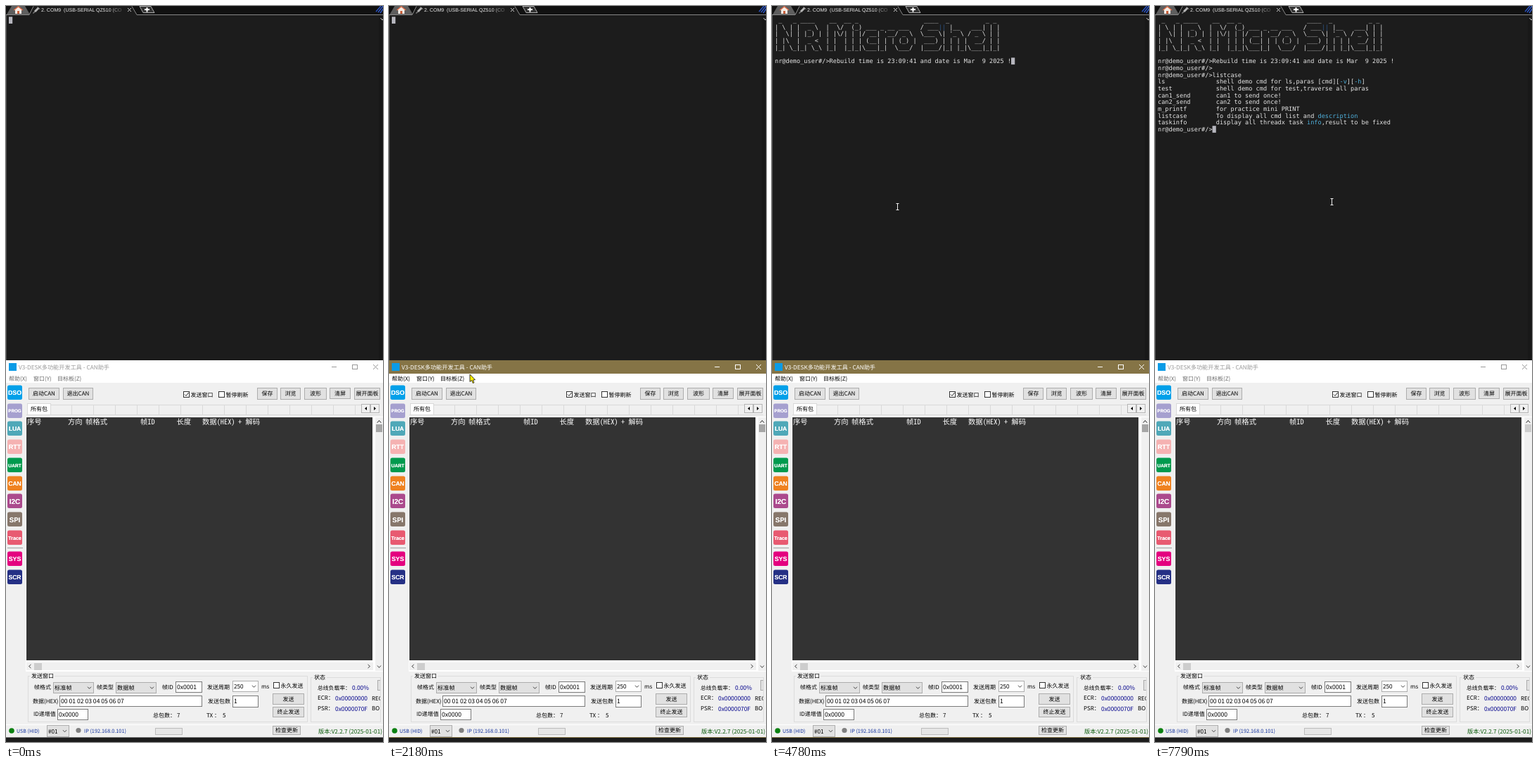
Recreate the animation shown at these times as an HTML page with a canvas. Size 536 by 1045 pixels, loop 8 s.

```html
<!DOCTYPE html>
<html lang="zh-CN">
<head>
<meta charset="utf-8">
<style>
html, body { margin: 0; width: 100%; height: 100%; overflow: hidden; background: #1c1c1c; }
canvas { display: block; }
</style>
</head>
<body>
<canvas id="stage" width="536" height="1045"></canvas>
<script>
const g = document.getElementById('stage').getContext('2d');
const LOOP = 8000, CELL = 5.17, ROW = 9.68;
const UI = '"Noto Sans CJK SC", "Noto Sans CJK", "Noto Sans", sans-serif';
const GRID = '"Noto Sans Mono CJK SC", "Noto Sans CJK SC", monospace';
const ARIAL = '"Liberation Sans", sans-serif';
const NAVY = '#00008b';

function box(x, y, x2, y2, fill, border) {
  if (fill) { g.fillStyle = fill; g.fillRect(x, y, x2 - x, y2 - y); }
  if (border) { g.strokeStyle = border; g.lineWidth = 1; g.strokeRect(x + .5, y + .5, x2 - x - 1, y2 - y - 1); }
}
function line(color, width, ...p) {
  g.strokeStyle = color; g.lineWidth = width; g.beginPath();
  for (let i = 0; i < p.length; i += 2) g.lineTo(p[i], p[i + 1]);
  g.stroke();
}
function poly(fill, ...p) {
  g.fillStyle = fill; g.beginPath();
  for (let i = 0; i < p.length; i += 2) g.lineTo(p[i], p[i + 1]);
  g.closePath(); g.fill();
}
function dot(x, y, r, fill) {
  g.fillStyle = fill; g.beginPath(); g.arc(x, y, r, 0, 7); g.fill();
}
// cy is the vertical centre of the glyphs
function text(s, x, cy, color = '#000', size = 8, font = UI, align = 'left') {
  g.font = `${size}px ${font}`; g.textAlign = align; g.fillStyle = color;
  g.fillText(s, x, cy + size * .37);
}
function chevron(x, y, dx, dy, color = '#444') {
  if (dy) line(color, 1, x - 2.5, y - dy, x, y + dy, x + 2.5, y - dy);
  else line(color, 1, x - dx, y - 2.5, x + dx, y, x - dx, y + 2.5);
}
function button(s, x, y, x2, y2) {
  box(x, y, x2, y2, '#e1e1e1', '#adadad');
  text(s, (x + x2) / 2, (y + y2) / 2, '#000', 8, UI, 'center');
}
function field(s, x, y, x2, y2) {
  box(x, y, x2, y2, '#fff', '#7a7a7a');
  text(s, x + 2, (y + y2) / 2 - .5, '#000', 8.6);
}
function combo(s, x, y, x2, y2, fill = '#e1e1e1') {
  box(x, y, x2, y2, fill, '#adadad');
  text(s, x + 2, (y + y2) / 2, '#000', 8.2);
  chevron(x2 - 6.5, (y + y2) / 2, 0, 1.3);
}
function check(s, x, y, on) {
  box(x, y, x + 9, y + 9, '#fff', '#333');
  if (on) line('#222', 1, x + 2, y + 4.5, x + 4, y + 6.5, x + 7.5, y + 2);
  text(s, x + 10.5, y + 4.7);
}

// ---- terminal ----
const PROMPT = 'nr@demo_user#/>';
const BOOT = String.raw` _   _ ____    __  __ _                  ____  _          _ _
| \ | |  _ \  |  \/  (_) ___ _ __ ___   / ___|| |__   ___| | |
|  \| | |_) | | |\/| | |/ __| '__/ _ \  \___ \| '_ \ / _ \ | |
| |\  |  _ <  | |  | | | (__| | | (_) |  ___) | | | |  __/ | |
|_| \_|_| \_\ |_|  |_|_|\___|_|  \___/  |____/|_| |_|\___|_|_|

` + PROMPT + 'Rebuild time is 23:09:41 and date is Mar  9 2025 !';
const HELP = [
  ['ls', 'shell demo cmd for ls,paras [cmd][-v][-h]'],
  ['test', 'shell demo cmd for test,traverse all paras'],
  ['can1_send', 'can1 to send once!'],
  ['can2_send', 'can2 to send once!'],
  ['m_printf', 'for practice mini PRINT'],
  ['listcase', 'To display all cmd list and description'],
  ['taskinfo', 'display all threadx task info,result to be fixed']
].map(([name, about]) => name.padEnd(16) + about).join('\n');

const typed = (t, from, to) => t < from ? 0 : Math.min(4, 1 + Math.floor((t - from) / (to - from) * 3 + .01));

function output(t) {
  if (t < 4090) return '';
  const part = Math.min(1, (Math.floor((t - 4090) / 70) + 1) / 5);
  let s = BOOT.slice(0, Math.round(BOOT.length * part));
  if (t >= 5610) s += '\n' + PROMPT;
  if (t >= 5810) s += '\n' + PROMPT + 'list'.slice(0, typed(t, 6470, 6860)) + 'case'.slice(0, typed(t, 7120, 7390));
  if (t >= 7790) s += '\n' + HELP + '\n' + PROMPT;
  return s;
}

function terminal(t) {
  box(0, 0, 536, 503, '#1c1c1c');
  box(530, 13, 536, 503, '#181818');
  box(0, 13, 1, 503, '#4a4a4a');
  chevron(535, 18.5, 0, 1.5, '#ccc');

  box(0, 0, 536, 12, '#111');
  poly('#5e5e5e', 1, 12, 8, 0, 27, 0, 34, 12);
  poly('#f4ece4', 11, 6, 17.5, 0, 24, 6, 22, 6, 22, 11, 13, 11, 13, 6);
  line('#d9603a', 1.3, 11, 6, 17.5, .8, 24, 6);
  box(16, 7, 19, 11, '#c8603c');
  poly('#1c1c1c', 33, 13, 39, 0, 179, 0, 186, 13);
  line('#888', 1, 0, 12.5, 33, 12.5, 39, .5);
  line('#888', 1, 179, .5, 186, 12.5, 536, 12.5);
  line('#b5b5b5', 3, 41, 8, 46, 3);
  line('#888', 1.2, 38.5, 10.5, 41, 8);
  line('#ddd', 1, 45, 1.5, 48, 4.5);
  const fade = g.createLinearGradient(146, 0, 168, 0);
  fade.addColorStop(0, '#eee'); fade.addColorStop(1, '#333');
  text('2. COM9  (USB-SERIAL QZ510 (CO', 50, 5.5, fade, 7.05, ARIAL);
  line('#ccc', 1, 173, 3, 178, 8);
  line('#ccc', 1, 178, 3, 173, 8);
  g.fillStyle = '#333'; g.beginPath(); g.moveTo(190, .5); g.lineTo(206, .5); g.lineTo(211, 9.5); g.lineTo(195, 9.5); g.closePath(); g.fill();
  line('#aaa', 1, 190, .5, 206, .5, 211, 9.5, 195, 9.5, 190, .5);
  line('#fff', 2, 197, 5, 204, 5);
  line('#fff', 2, 200.5, 2, 200.5, 8.5);
  for (const d of [0, 3, 6]) line('#2b55c8', 1.4, 526 + d, 8 + d / 3, 533 + d, 0);

  const rows = output(t).split('\n');
  g.font = '8.58px "DejaVu Sans Mono", monospace';
  g.textAlign = 'left';
  rows.forEach((row, r) => {
    const colors = Array(row.length).fill('#e6e6e6');
    for (const m of row.matchAll(/\|\||-[vh](?=\])|description|info(?=,)/g))
      colors.fill(m[0] === '||' ? '#2d5486' : '#4fb0dc', m.index, m.index + m[0].length);
    [...row].forEach((ch, c) => {
      g.fillStyle = colors[c];
      if (ch !== ' ') g.fillText(ch, 4 + c * CELL, 23.3 + r * ROW - 0.2);
    });
  });
  const last = rows.length - 1, cx = 4 + rows[last].length * CELL, cy = 15.3 + last * ROW;
  box(cx, cy, cx + 5.2, cy + 9.7, '#b6b6be');

  // selected blank row
  if (t >= 875 && t < 1020) box(4, 335, 526, 345, '#f0efed');
  if (t >= 1020 && t < 1560) box(4, 296, 526, 306, '#f0efed');
}

// ---- tool window ----
const ICONS = [
  ['DSO', 549, '#00a0e9', 8.8], ['PROG', 575, '#a6a0cf', 6.3], ['LUA', 600, '#4fa8b8', 8.6],
  ['RTT', 626, '#f5b2b2', 9], ['UART', 652, '#009a4e', 6.8], ['CAN', 678, '#ef8220', 8.6],
  ['I2C', 703, '#ab4a8d', 10], ['SPI', 729, '#87776b', 9.6], ['Trace', 755, '#e85a71', 7.2],
  ['SYS', 785, '#e4007f', 8.8], ['SCR', 811, '#253085', 8.6]
];
const MENU = [
  ['复位(50ms)  --软件和硬件复位(5)', 544], ['TVCC断电上电复位(200ms)(T)', 558],
  ['TVCC断电(V)', 572], ['TVCC上电(3.3V)(C)', 586], ['TVCC上电(5.0V) --注意CPU电压等级(0)', 605]
];

function toolWindow(t) {
  const active = t >= 2180 && t < 5050, open = t >= 3260 && t < 4020;
  box(0, 503, 536, 1039, '#f0f0f0');
  box(0, 503, 536, 522, active ? '#857446' : '#fff');
  box(0, 522, 536, 535, '#fff');
  box(4, 507, 15, 518, '#0a9be6');
  const ink = active ? '#fff' : '#999';
  text('V3-DESK多功能开发工具 - CAN助手', 18, 512.5, ink, 8.2);
  line(ink, 1, 463, 512.5, 470, 512.5);
  box(492, 509, 500, 516, null, ink);
  line(ink, 1, 522, 509, 529, 516);
  line(ink, 1, 529, 509, 522, 516);
  if (open) box(69, 522, 111, 535, '#cce8ff', '#99d1ff');
  ['帮助(X)', '窗口(Y)', '目标板(Z)'].forEach((s, i) => text(s, [4, 39, 73][i], 529, active ? '#000' : '#6d6d6d'));

  for (const [s, y, color, size] of ICONS) {
    g.fillStyle = color; g.beginPath(); g.roundRect(2, y - 10.5, 21, 20.5, 2.5); g.fill();
    text(s, 12.5, y, '#fff', size, ARIAL.replace(/^/, ''), 'center');
    g.font = `bold ${size}px ${ARIAL}`; g.fillText(s, 12.5, y + size * .37);
  }
  line('#a0a0a0', 1, 2, 769.5, 24, 769.5);

  button('启动CAN', 32, 542, 76, 559);
  button('退出CAN', 81, 542, 124, 559);
  check('发送窗口', 252, 547, true);
  check('暂停刷新', 302, 547);
  button('保存', 357, 542, 386, 559);
  button('浏览', 390, 542, 419, 559);
  button('波形', 424, 542, 456, 559);
  button('清屏', 460, 542, 490, 558);
  button('展开面板', 495, 542, 532, 559);

  // tab strip
  line('#d9d9d9', 1, 64, 566.5, 505, 566.5);
  line('#d9d9d9', 1, 29, 580.5, 532, 580.5);
  for (let x = 93; x < 505; x += 31) line('#d9d9d9', 1, x + .5, 566, x + .5, 580);
  box(30, 564, 64, 581, '#fff', '#d9d9d9');
  text('所有包', 35, 572);
  box(505, 565, 518, 578, '#f0f0f0', '#b5b5b5');
  box(518, 565, 531, 578, '#f0f0f0', '#b5b5b5');
  poly('#000', 510, 571.5, 513, 569, 513, 574);
  poly('#000', 526, 571.5, 523, 569, 523, 574);

  // packet list
  box(28, 583, 536, 945, '#fff');
  box(29, 584, 521, 929, '#333');
  for (const [s, x] of [['序号', 30], ['方向', 88], ['帧格式', 113], ['帧ID', 191], ['长度', 242.5],
    ['数据', 279], ['(HEX)', 299.7], ['+', 330], ['解码', 340.5]]) text(s, x, 590.5, '#fff', 10.33, GRID);
  box(525, 584, 536, 944, '#f0f0f0');
  box(29, 932, 522, 943, '#f0f0f0');
  chevron(530.5, 590, 0, -1.5); chevron(530.5, 590, 0, 1.5, '#f0f0f0');
  line('#444', 1, 528, 591.5, 530.5, 588.5, 533, 591.5);
  chevron(530.5, 938, 0, 1.5);
  chevron(34, 937.5, -1.5, 0);
  chevron(516, 937.5, 1.5, 0);
  box(526, 594, 535, 605, t < 5260 ? '#a6a6a6' : '#cdcdcd');
  box(40, 933, 51, 943, '#cdcdcd');

  // send panel
  box(31, 951, 429, 1017, null, '#dcdcdc');
  box(34, 946, 69, 956, '#f0f0f0');
  text('发送窗口', 36, 951);
  text('帧格式', 40, 967.5);
  combo('标准帧', 67, 960, 125, 976);
  text('帧类型', 129, 967.5);
  combo('数据帧', 156, 960, 214, 976);
  text('帧ID', 222, 967.5);
  field('0x0001', 241, 959, 279, 975);
  text('发送周期', 286, 967);
  combo('250', 322, 958, 359, 974, '#fff');
  text('ms', 363, 966);
  check('永久发送', 380, 960);
  text('数据(HEX)', 38, 987.5);
  field('00 01 02 03 04 05 06 07', 76, 979, 279, 995);
  text('发送包数', 287, 987.5);
  field('1', 322, 979, 359, 996);
  button('发送', 379, 976, 424, 992);
  text('ID递增值', 39, 1005.5);
  field('0x0000', 73, 998, 117, 1014);
  text('总包数：', 209, 1007); text('7', 243, 1007);
  text('TX ：', 285, 1007); text('5', 308, 1007.5);
  button('终止发送', 379, 995, 424, 1010);

  // bus state
  box(433, 953, 533, 1017, null, '#dcdcdc');
  box(436, 948, 456, 958, '#f0f0f0');
  text('状态', 438, 953);
  text('总线负载率：', 443, 968, '#000', 7.8);
  text('0.00%', 492, 968, NAVY, 8.4);
  text('ECR：', 443, 982.5); text('0x00000000', 468, 982.5, NAVY, 8.4);
  text('PSR：', 443, 997.5); text('0x0000070F', 468, 997.5, NAVY, 8.4);
  g.save(); g.beginPath(); g.rect(433, 950, 99, 66); g.clip();
  text('REC', 520, 983); text('BO', 520, 997.5);
  box(528, 957, 545, 972, '#e1e1e1', '#adadad');
  g.restore();

  // status bar
  line('#fff', 1, 0, 1020.5, 536, 1020.5);
  dot(8, 1029, 3.8, '#0a8010');
  text('USB (HID)', 15, 1029, '#10309c', 7.1);
  combo('#01', 58, 1021, 90, 1038);
  dot(103, 1028.5, 3.6, '#808080');
  text('IP (192.168.0.101)', 111, 1029, '#10309c', 7.3);
  box(212, 1025, 251, 1035, '#e6e6e6', '#bcbcbc');
  button('检查更新', 379, 1022, 419, 1035);
  text('版本:V2.2.7 (2025-01-01)', 444, 1029.5, '#0a5a0a', 8.2);
  box(0, 1038, 536, 1039, active ? '#857446' : '#777');
  box(0, 1039, 536, 1045, '#1c1c1c');

  if (open) {
    box(68, 534, 264, 614, '#f2f2f2', '#c8c8c8');
    if (t >= 3540) box(70, 537, 262, 551, '#91c9f7');
    line('#d0d0d0', 1, 89, 596.5, 262, 596.5);
    for (const [s, y] of MENU) text(s, 91, y);
  }
}

// ---- mouse pointer: time, x, y ----
const PATH = [
  [200, 330, 1040], [950, 245, 334], [1020, 205, 300], [1360, 189, 397], [1480, 189, 397],
  [1770, 138, 503], [1980, 115, 523], [2240, 115, 523], [2500, 122, 504], [2930, 100, 518],
  [3260, 100, 518], [3330, 97, 526], [3540, 97, 527], [3750, 101, 548], [4500, 101, 548],
  [4780, 178, 285], [4850, 178, 285], [5050, 251, 278], [LOOP, 251, 278]
];
function pointer(t) {
  const i = PATH.findIndex(k => k[0] > t);
  if (i < 1) return;
  const [a, b] = [PATH[i - 1], PATH[i]], u = (t - a[0]) / (b[0] - a[0]);
  const x = a[1] + (b[1] - a[1]) * u, y = a[2] + (b[2] - a[2]) * u;
  g.save(); g.translate(Math.round(x), Math.round(y));
  if (y < 503) {
    line('#eee', 1, .5, -4, .5, 5);
    line('#eee', 1, -1.5, -4.5, 2.5, -4.5);
    line('#eee', 1, -1.5, 4.5, 2.5, 4.5);
  } else {
    const arrow = [0, 0, 0, 10.5, 2.5, 8.5, 4.3, 12.5, 6, 11.7, 4.4, 8, 7.5, 7.7];
    poly('#ffee00', ...arrow);
    line('#222', .9, ...arrow, 0, 0);
  }
  g.restore();
}

function draw(now) {
  const t = now % LOOP;
  g.textRendering = 'geometricPrecision';
  terminal(t);
  toolWindow(t);
  pointer(t);
  requestAnimationFrame(draw);
}
requestAnimationFrame(draw);
</script>
</body>
</html>
```
